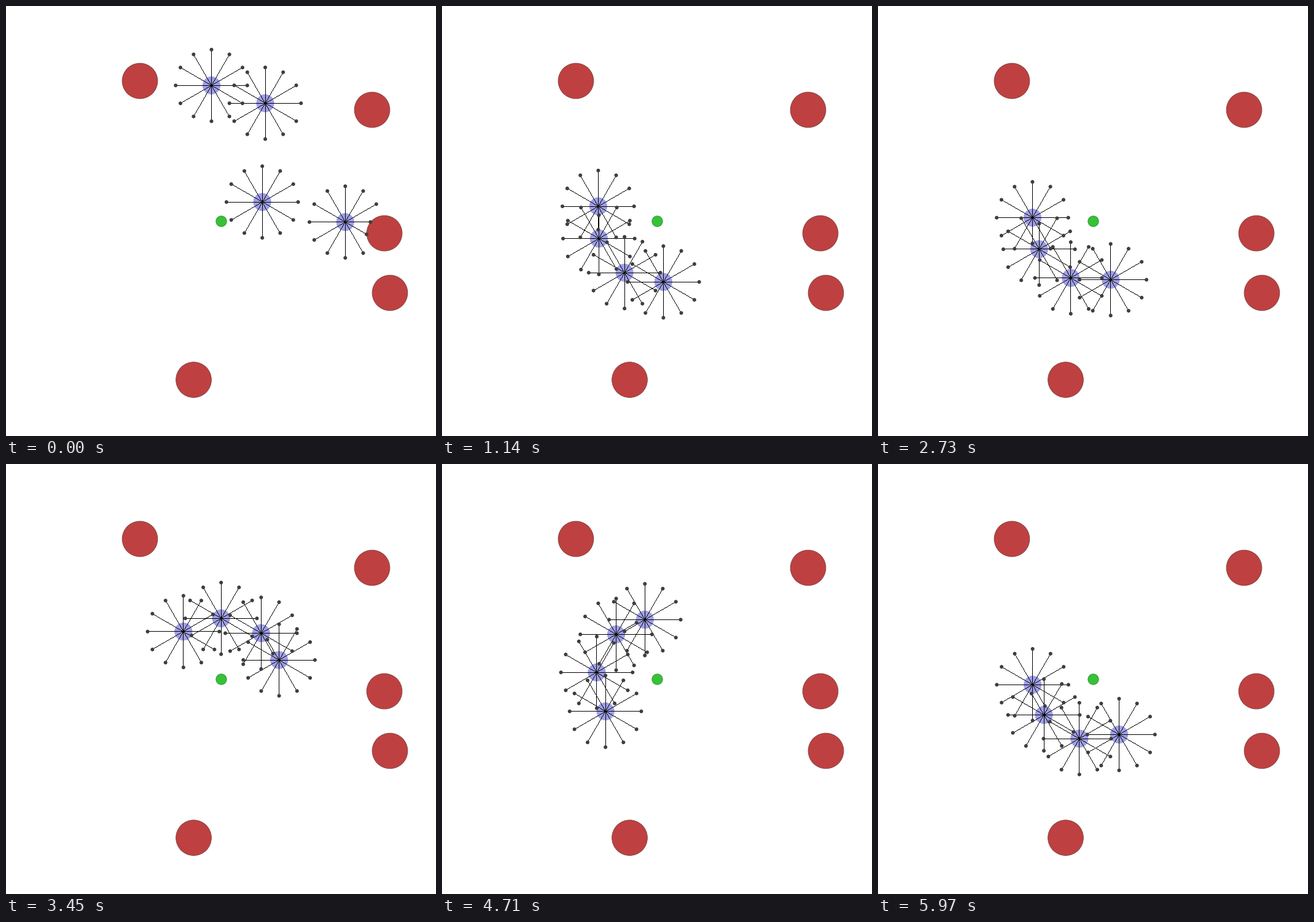
Recreate the animation shown at these times as a matplotlib script. Size 700 px wide and 700 px high, loop 6 s.

```python
import numpy as np
import matplotlib.pyplot as plt
from matplotlib.animation import FuncAnimation
from matplotlib.collections import PolyCollection
from matplotlib.patches import Circle

SIZE, DPI = 700, 100
FRAMES, INTERVAL = 200, 30
PX = 72 / DPI                      # points per pixel

GOAL = np.array([350, 350])
ORBIT = 99.2                       # radius of the shared circle
TURN = 6.588                       # clockwise degrees per frame
BODY, ROCK, REACH = 14.6, 29.2, 58.3

OBSTACLES = [(217.5, 121.5), (595.5, 168.5), (615.5, 369.5),
             (624.5, 466.5), (305, 608)]
# start position and the orbit angle each agent has, traced back to time 0
AGENTS = [((334, 128.8), 166.05), ((421.5, 157.8), 127.8),
          ((416.7, 318.6), 86.8), ((551.8, 351.2), 56.1)]

fig = plt.figure(figsize=(SIZE / DPI, SIZE / DPI), dpi=DPI, facecolor="white")
ax = fig.add_axes([0, 0, 1, 1])
ax.set_xlim(-0.5, SIZE - 0.5)
ax.set_ylim(SIZE - 0.5, -0.5)
ax.axis("off")


def rgb(r, g, b):
    return r / 255, g / 255, b / 255


def ring(n):
    a = np.linspace(0, 2 * np.pi, n, endpoint=False)
    return np.column_stack([np.cos(a), np.sin(a)])


def ramp(x, width=0.8):
    """max(x, 0) with a rounded corner."""
    return width * np.logaddexp(0, x / width)


def disc(center, radius, fill, edge):
    ax.add_patch(Circle(center, radius, fc=fill, ec=edge, lw=PX, zorder=1))


for spot in OBSTACLES:
    disc(spot, ROCK - 0.4, rgb(191, 64, 64), rgb(135, 68, 66))
disc(GOAL, 8.6, rgb(54, 194, 54), rgb(50, 150, 50))

SPOKES = ring(12)
STEP = SPOKES / np.abs(SPOKES).max(axis=1, keepdims=True)
COUNT = np.arange(int(REACH) + 1)
PIXEL = 0.45 * np.array([(-1, -1), (1, -1), (1, 1), (-1, 1)])
DOT = 3 * ring(24)


def shapes(color, z, **style):
    group = PolyCollection([], facecolors=[color], linewidths=0, zorder=z,
                           **style)
    return ax.add_collection(group, autolim=False)


bodies = [ax.add_patch(Circle(start, BODY, lw=0, fc=(0.25, 0.25, 0.8, 0.5),
                              zorder=2)) for start, _ in AGENTS]
rays = shapes("black", 3, antialiaseds=False)
dots = shapes(rgb(62, 62, 62), 4)


def locate(start, slot, t):
    """Head straight for the circle, then follow it clockwise."""
    dx, dy = np.subtract(start, GOAL)
    dist, angle = np.hypot(dx, dy), np.degrees(np.arctan2(-dy, dx))
    join = (slot - angle) / TURN
    r = ORBIT + (dist - ORBIT) * ramp(join - t) / ramp(join)
    a = np.radians(angle - TURN * ramp(t - join))
    return GOAL + r * np.array([np.cos(a), -np.sin(a)])


def sense(pos, targets):
    """Length of each spoke, cut where it meets a disc."""
    reach = np.full(len(SPOKES), REACH)
    for center, radius in targets:
        rel = np.subtract(center, pos)
        along = SPOKES @ rel
        half = radius ** 2 - rel @ rel + along ** 2
        hit = along - np.sqrt(np.maximum(half, 0))
        reach = np.where((half > 0) & (hit > 0), np.minimum(reach, hit), reach)
    return reach


def trace(pos, reach):
    """Pixels covered by one-pixel lines along the spokes."""
    track = COUNT[None, :, None] * STEP[:, None, :]
    inside = np.hypot(*np.moveaxis(track, -1, 0)) <= reach[:, None]
    return np.round(pos + track[inside])


def update(i):
    spots = [locate(start, slot, i) for start, slot in AGENTS]
    rocks = [(spot, ROCK) for spot in OBSTACLES]
    lines, ends = [], []
    for k, pos in enumerate(spots):
        others = [(p, BODY) for j, p in enumerate(spots) if j != k]
        reach = sense(pos, rocks + others)
        lines.append(trace(pos, reach))
        ends.append(pos + reach[:, None] * SPOKES)
        bodies[k].center = pos
    rays.set_verts(np.concatenate(lines)[:, None] + PIXEL)
    dots.set_verts(np.concatenate(ends)[:, None] + DOT)
    return [*bodies, rays, dots]


anim = FuncAnimation(fig, update, frames=FRAMES, interval=INTERVAL,
                     repeat=True, repeat_delay=0, blit=False)
plt.show()
```
